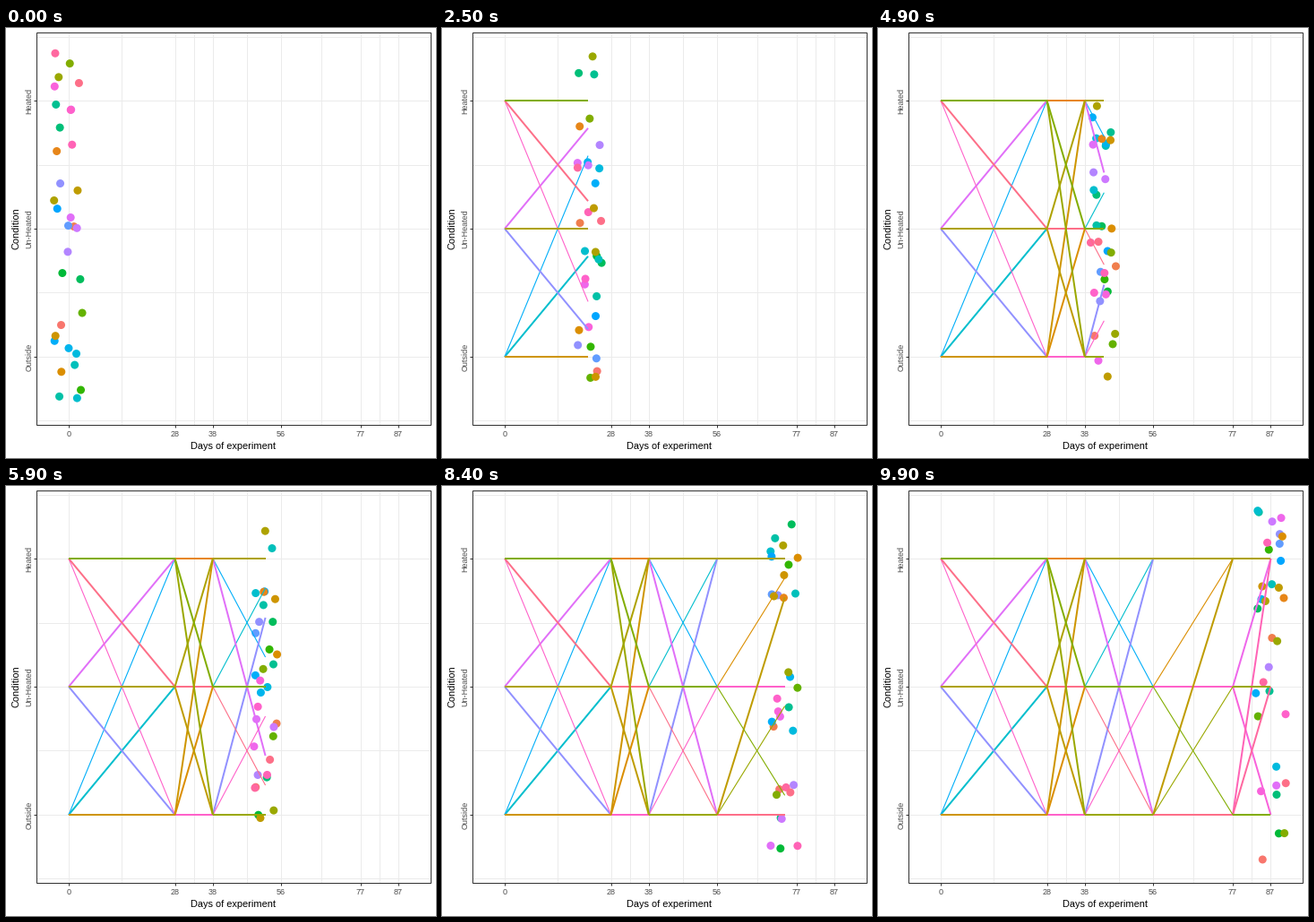
A matplotlib script that plays this animation: 480 by 480 pixels, repeating every 10 s.

```python
from itertools import permutations

import matplotlib.pyplot as plt
import numpy as np
from matplotlib.animation import FuncAnimation
from matplotlib.collections import LineCollection
from matplotlib.patches import Rectangle

plt.rcParams["font.family"] = "Liberation Sans"

SIZE, FRAMES = 480, 100
DAYS = np.array([0, 28, 38, 56, 77, 87])
SITES = {"O": ("Outside", 367), "U": ("Un-Heated", 224), "H": ("Heated", 81)}
LEFT, TOP, RIGHT, BOTTOM = 34, 5, 474, 443
GRID, INK, LABEL = "#EBEBEB", "#333333", "#4D4D4D"


def day_x(day):
    return 70 + 4.235 * day


def make_paths():
    """Site of every subject on each day; nobody leaves the heated site late."""
    moves = list(permutations(SITES))
    stay = [site * 6 for site in SITES]
    early = [a + a + b + b + 2 * (b if b == "H" else c) for a, b, c in moves]
    late = [a * 3 + b * 3 for a, b, _ in moves]
    often = [a + b + b + c + c + (c if c == "H" else last)
             for a, b, c in moves for last in (a, b, c)]
    return stay + early + late + often


def hcl(hue, chroma=100, lum=65):
    """Polar CIE-LUV colour as clipped sRGB."""
    a = np.radians(hue)
    y = ((lum + 16) / 116) ** 3
    u = chroma * np.cos(a) / (13 * lum) + 0.1978398
    v = chroma * np.sin(a) / (13 * lum) + 0.4683363
    x = 9 * y * u / (4 * v)
    z = -x / 3 - 5 * y + 3 * y / v
    rgb = np.array([
        3.240479 * x - 1.537150 * y - 0.498535 * z,
        -0.969256 * x + 1.875992 * y + 0.041556 * z,
        0.055648 * x - 0.204043 * y + 1.057311 * z,
    ]).clip(0, 1)
    return np.where(rgb > 0.00304, 1.055 * rgb ** (1 / 2.4) - 0.055, 12.92 * rgb)


paths = make_paths()
N = len(paths)
order = sorted(range(N), key=lambda i: str(i + 1))  # groups stack by name
colors = np.array([hcl(15 + 360 * i / N) for i in range(N)])
levels = np.array([[SITES[s][1] for s in path] for path in paths])

# Each dot is jittered around its site once per day of the experiment.
rng = np.random.default_rng(12)
dots = np.stack([day_x(DAYS) + rng.uniform(-17, 17, levels.shape),
                 levels + rng.uniform(-57, 57, levels.shape)], axis=-1)

# Shared legs are drawn once, in the colour of the topmost subject.
legs = {}
for i in order:
    for k in range(len(DAYS) - 1):
        key = (k, levels[i, k], levels[i, k + 1])
        legs.pop(key, None)
        legs[key] = colors[i]

fig = plt.figure(figsize=(SIZE / 72, SIZE / 72), dpi=72, facecolor="white")
ax = fig.add_axes([0, 0, 1, 1])
ax.set(xlim=(0, SIZE), ylim=(SIZE, 0))
ax.axis("off")


def rule(xs, ys, color, z):
    ax.plot(xs, ys, color=color, lw=1, zorder=z, solid_capstyle="butt")


def label(x, y, text, size=9, color=LABEL, angle=0):
    ax.text(x, y, text, size=size, color=color, rotation=angle,
            ha="center", va="center")


for x in np.round(day_x(np.r_[DAYS, (DAYS[1:] + DAYS[:-1]) / 2])):
    rule([x, x], [TOP, BOTTOM], GRID, 1)
for y in np.round(np.linspace(10, 438, 7)):
    rule([LEFT, RIGHT], [y, y], GRID, 1)
for day in DAYS:
    x = round(day_x(day))
    rule([x, x], [BOTTOM, BOTTOM + 3], INK, 5)
    label(x, 454, str(day))
for name, y in SITES.values():
    rule([LEFT - 3, LEFT], [y, y], INK, 5)
    label(26, y, name, angle=90)
label(254, 467.5, "Days of experiment", 11, "black")
label(12, 223.5, "Condition", 11, "black", 90)
ax.add_patch(Rectangle((LEFT, TOP), RIGHT - LEFT, BOTTOM - TOP, fill=False,
                       ec=INK, lw=1, zorder=5))

points = ax.scatter(*dots[order, 0].T, s=9 ** 2, c=colors[order], lw=0,
                    zorder=3, snap=False)
lines = LineCollection([], zorder=4, capstyle="butt")
ax.add_collection(lines)


def stroke(k, start, end):
    """Mid-slope strokes are thinner than flat or steep ones."""
    slope = abs(end - start) / (day_x(DAYS[k + 1]) - day_x(DAYS[k]))
    return 1.1 if 1.4 < slope < 2.5 else 2


def update(frame):
    now = DAYS[-1] * frame / (FRAMES - 1)
    leg = min(np.searchsorted(DAYS, now, side="right") - 1, len(DAYS) - 2)
    t = (now - DAYS[leg]) / (DAYS[leg + 1] - DAYS[leg])
    spots = dots[:, leg] + t * (dots[:, leg + 1] - dots[:, leg])
    points.set_offsets(spots[order])

    segs, hues, widths = [], [], []
    for (k, start, end), color in legs.items():
        if DAYS[k] >= now:
            continue
        stop = min(now, DAYS[k + 1])
        y = np.interp(stop, DAYS[k:k + 2], [start, end])
        segs.append([(day_x(DAYS[k]), start), (day_x(stop), y)])
        hues.append(color)
        widths.append(stroke(k, start, end))
    lines.set_segments(segs)
    lines.set_color(hues)
    lines.set_linewidth(widths or [1])
    return points, lines


anim = FuncAnimation(fig, update, frames=FRAMES, interval=100,
                     repeat=True, repeat_delay=0)
plt.show()
```
